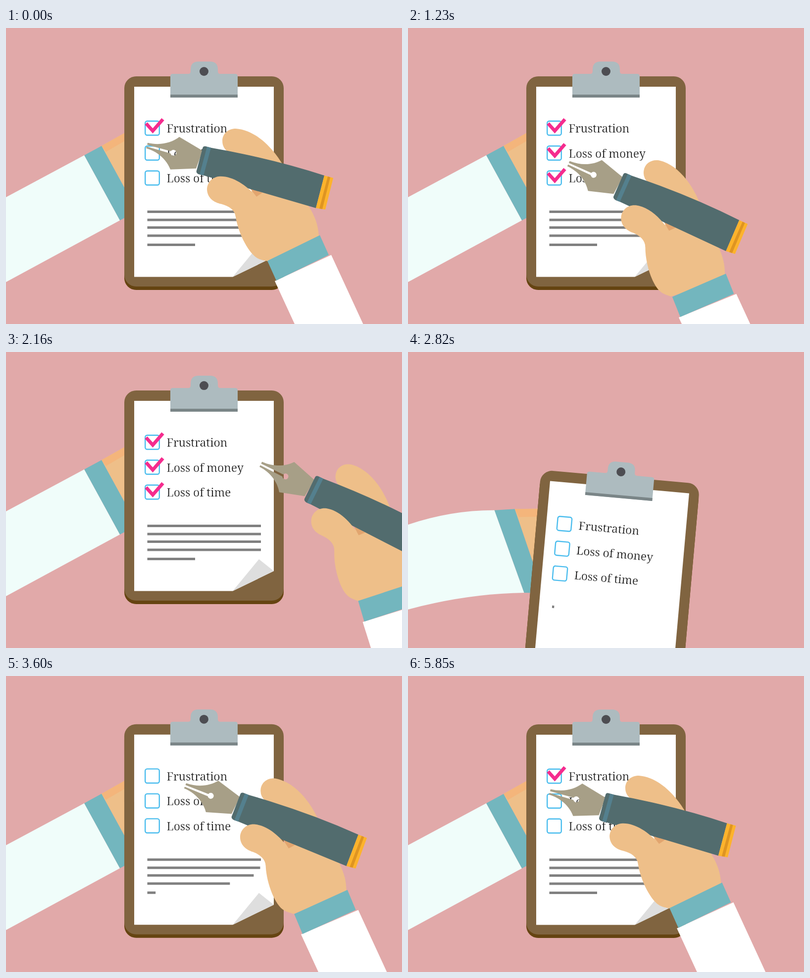
Recreate the animation shown at these times as an HTML page. Size 800x600 px, loop 5880 ms.

```html
<!DOCTYPE html>
<html lang="en">
<head>
<meta charset="utf-8">
<title>Checklist</title>
<style>
  html, body { margin: 0; width: 100%; height: 100%; overflow: hidden; background: #e1a9a9; }
  svg { display: block; width: 800px; height: 600px; }
  text { font: 300 23px "Noto Serif", serif; letter-spacing: -.15px; fill: #111; stroke: #fff; stroke-width: .4; }
  .box { fill: #fff; stroke: #4bbdee; stroke-width: 2.4; }
  .tick { fill: none; stroke: #f52c8e; stroke-width: 7; }
  .line { stroke: #808080; stroke-width: 5; }
  .skin { fill: #eebf89; }
  .cuff { fill: #73b6be; }
</style>
</head>
<body>
<svg viewBox="0 0 800 600">
  <g id="scene">
    <path id="palm" class="skin"/>
    <path id="knuckle" fill="#f4b57b"/>
    <path id="leftCuff" class="cuff"/>
    <path id="leftSleeve" fill="#f0fdfa"/>

    <g id="board">
      <rect x="239" y="105" width="322" height="426" rx="24" fill="#654411"/>
      <rect x="239" y="98" width="322" height="426" rx="24" fill="#806440"/>
      <path fill="#fff" d="M259,119H541V464L458,504.5H259Z"/>
      <path fill="#dedede" d="M458,504.5L511,440L541,464Z"/>
      <path fill="#adbbbf" d="M332,141V98Q332,93 337,93H368Q373,93 373,88V84Q373,68 389,68H412Q428,68 428,84V88Q428,93 433,93H463Q468,93 468,98V141Z"/>
      <path fill="#7a8587" d="M332,135H468V141H332Z"/>
      <circle cx="400" cy="88" r="9" fill="#4d4d52"/>
      <g id="rows"></g>
      <g id="lines"></g>
    </g>

    <g id="arm">
      <g id="hand">
        <path class="skin" d="M437,229C437,214 449,204 464,204C508,207 546,250 566,290L612,362C624,382 630,397 632,421L530,473C520,471 513,470 507,466C488,454 466,410 463,375L520,300L450,252Q437,244 437,229Z"/>
        <path fill="#e2a56f" d="M492,324L506,342L518,334Z"/>
        <path fill="#a79f87" d="M286,233C312,239 334,233 350,221L397,249L384,285L332,287C324,266 305,250 283,244L284,240.5L332.3,254.5A6 6 0 1 0 333,250L285,237Z"/>
        <path fill="#526c6e" d="M403,240L414,243Q535,264 643,299L626,365L399,299L390,297Q383,294 385,289L397,244Q398,239 403,240Z"/>
        <path fill="#54808e" d="M406,241L414,243L399,299L391,297Z"/>
        <path fill="#fdb32c" d="M643,299L661,304L645,368L626,365Z"/>
        <path fill="#de9422" d="M650,301L655,302.5L639,367L633,366Z"/>
        <path class="skin" d="M506,342C485,318 457,300 432,301C416,302 406,314 406,328C407,345 420,354 435,357C450,361 461,368 464,382Z"/>
      </g>
      <path id="sleeve" fill="#fff"/>
      <path class="cuff" d="M-53,26L53,-26L71,14L-35,66Z"/>
    </g>
  </g>
</svg>
<script>
const LOOP = 5880, START = 2700;   // the cycle is counted from the board's entry
const ROW = 50.5, STROKE = 300, APPROACH = 280;
const strokeStart = [1920, 3190, 3900];

const $ = id => document.getElementById(id);
const setPath = (id, d) => $(id).setAttribute('d', d);
const move = (id, transform) => $(id).setAttribute('transform', transform);
const smooth = u => u * u * (3 - 2 * u);
const easeOut = u => 1 - (1 - u) ** 3;
const span = (s, from, length) => Math.min(1, Math.max(0, (s - from) / length));
const mix = (a, b, k) => a.map((v, i) => v + (b[i] - v) * k);

$('rows').innerHTML = ['Frustration', 'Loss of money', 'Loss of time'].map((label, i) =>
  `<g transform="translate(0 ${i * ROW})">
    <rect class="box" x="281.2" y="188.7" width="28.6" height="28.6" rx="4"/>
    <text x="324.5" y="212">${label}</text>
    <path class="tick" pathLength="100" d="M283,193.5L296.5,208.5L317,185"/>
  </g>`).join('');
$('lines').innerHTML = [372.5, 389, 404.5, 421, 439.5].map(y =>
  `<line class="line" x1="285.5" x2="285.5" y1="${y}" y2="${y}"/>`).join('');
const ticks = document.querySelectorAll('.tick');
const lines = document.querySelectorAll('.line');

// A pose is wrist x, wrist y, cuff angle, hand angle, sleeve swing.
const outside = [1110, 560, 7.9, 11, 7.3];
const ready = [636, 458, 1.7, 6.2, 0];
const away = [767.5, 506, 7.9, 11, 7.3];

function strokePose(row, u) {
  const turn = u ** 2.5;
  return [581 + 7 * u + 7 * Math.sin(Math.PI * u), 395.5 + ROW * row + 25 * u, 2.6 * turn, 8.8 * turn, 0];
}

function poseAt(s) {
  let pose = mix(outside, ready, easeOut(span(s, 300, 550)));
  strokeStart.forEach((start, row) => {
    const target = strokePose(row, span(s, start, STROKE));
    pose = mix(pose, target, smooth(span(s, start - APPROACH, APPROACH)));
  });
  return mix(pose, away, smooth(span(s, 4410, 590)));
}

function drawRightArm(s) {
  const [x, y, cuff, hand, swing] = poseAt(s);
  move('arm', `translate(${x} ${y}) rotate(${cuff})`);
  move('hand', `rotate(${hand - cuff} -38 -20) translate(-581 -446)`);
  const angle = (65.3 + swing - cuff) * Math.PI / 180;
  const dx = 400 * Math.cos(angle), dy = 400 * Math.sin(angle);
  setPath('sleeve', `M-38,67L76,14l${dx},${dy}L${dx - 38},${dy + 67}Z`);
}

// The arm sags more towards the board, and its sleeve edges bow upwards.
function drawLeftArm(drop) {
  const bend = Math.min(drop / 154.5, 1);
  const sink = Math.max(0, drop - 154.5);
  const at = (x, y) => [
    x + bend * x * (420 - y) * .00065,
    y + bend * (7 + .26 * x + .0006 * x * x) + sink
  ];
  const edge = (a, b) => `Q${(a[0] + b[0]) / 2},${(a[1] + b[1]) / 2 - 15 * bend} ${b}`;
  const shape = (...points) => `M${points.join('L')}Z`;
  const top = at(158, 258), bottom = at(230, 390), inner = at(193, 239), low = at(265, 371);
  const shoulder = at(0, 343), armpit = at(0, 515), far = at(300, 178.5);
  setPath('leftSleeve', `M${shoulder}${edge(shoulder, top)}L${bottom}${edge(bottom, armpit)}Z`);
  setPath('leftCuff', shape(top, inner, low, bottom));
  setPath('palm', shape(inner, far, at(300, 352), low));
  setPath('knuckle', shape(inner, far, at(300, 194), at(202, 251)));
}

function draw(now) {
  const s = (now - START + LOOP) % LOOP;

  // springy entry of the board, then a short hop and a fall
  const age = s + 30;
  const drop = 560 * Math.exp(-.00667 * age) * Math.cos(.00477 * age);
  const hop = -20 * smooth(span(s, 5250, 90)) + 640 * span(s, 5340, 180) ** 2;
  move('scene', `translate(0 ${hop})`);
  move('board', `translate(0 ${drop}) rotate(${Math.min(drop / 30.3, 8)} 400 430)`);

  drawLeftArm(drop);
  drawRightArm(s);
  ticks.forEach((tick, i) =>
    tick.setAttribute('stroke-dasharray', `${100 * span(s, strokeStart[i], STROKE)} 200`));
  lines.forEach((line, i) => {
    const grown = easeOut(span(s, 116 + 120 * i + 16 * i * i, 800));
    line.setAttribute('x2', 285.5 + (i < 4 ? 229.5 : 96.5) * grown);
  });
}

const begin = performance.now();
function frame() {
  draw((performance.now() - begin) % LOOP);
  requestAnimationFrame(frame);
}
frame();
</script>
</body>
</html>
```
